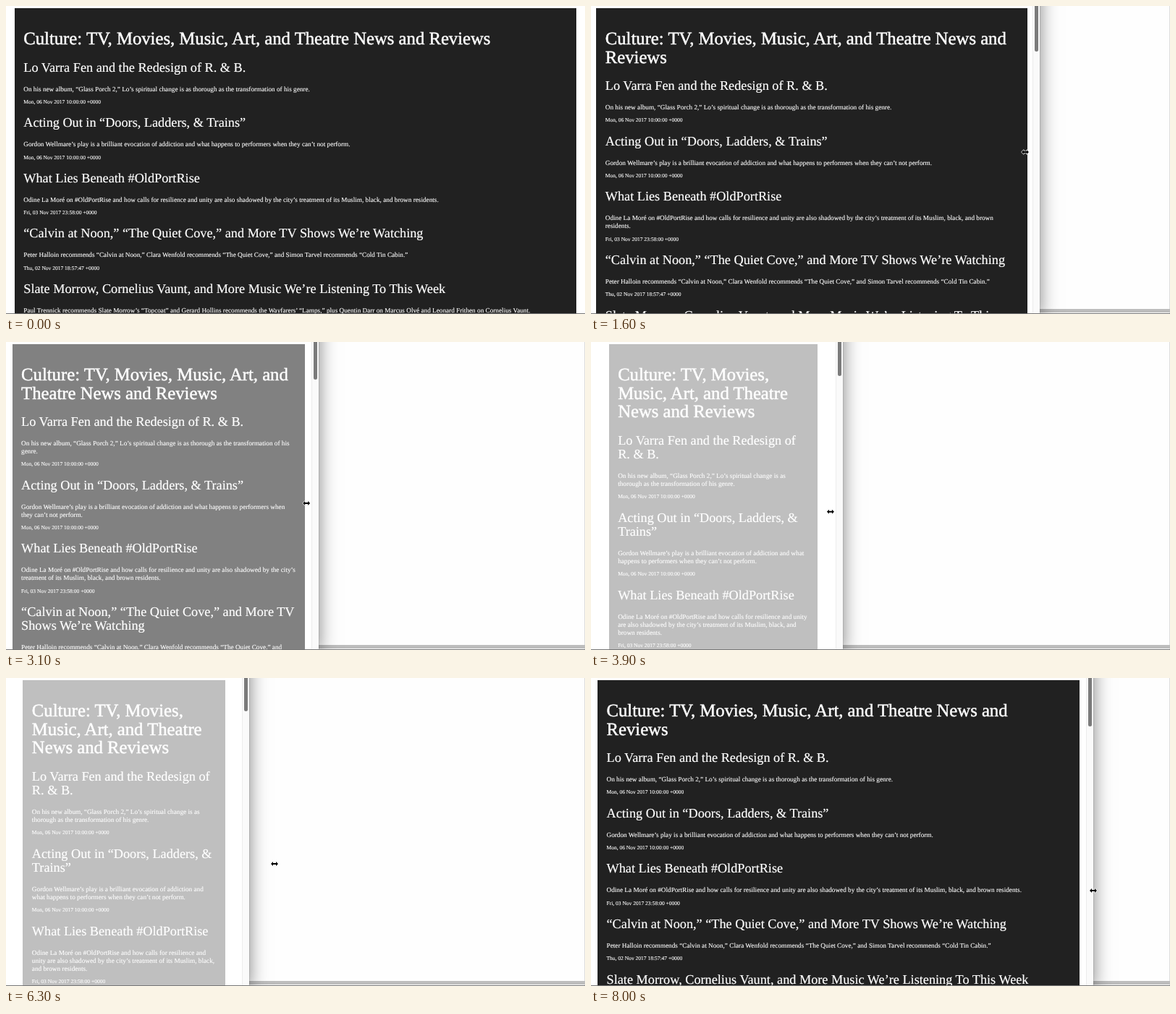
An HTML page that plays this animation: 800 px wide and 426 px high, repeating every 8100 ms.

```html
<!DOCTYPE html>
<html lang="en">
<head>
<meta charset="utf-8">
<title>Responsive news feed</title>
<style>
  html, body { margin: 0; width: 100%; height: 100%; overflow: hidden; background: #fefefe; }
  #stage { position: relative; width: 800px; height: 426px; overflow: hidden; }
  #stage > * { position: absolute; }
  .edge { left: 799px; top: 0; width: 1px; height: 426px; background: #ddd; }
  .hbar { left: 273px; top: 419px; width: 540px; height: 5px; border-radius: 3px; background: #bdbdbd; }
  .base { left: 0; top: 425px; width: 800px; height: 1px; background: #777; }
  /* The window's top edge lies above the stage */
  #win {
    left: 0; top: -40px; height: 465px; background: #fff;
    box-shadow: 0 0 1px rgba(0, 0, 0, .5), 0 6px 24px rgba(0, 0, 0, .5);
  }
  #view, #track { position: absolute; top: 40px; height: 425px; overflow: hidden; }
  #view { left: 0; }
  #track { right: 0; width: 9px; background: #fafafa; border-left: 1px solid #ececec; }
  #thumb { position: absolute; left: 2px; top: -3px; width: 5px; border-radius: 3px; background: #7b7b7b; }
  #feed {
    margin: 3px auto 0; padding: 30.4px 12.5px; color: #fff;
    font-family: "Liberation Serif", "Times New Roman", serif;
    text-rendering: geometricPrecision;
  }
  h1, h2, p { margin: 0; font-weight: 400; }
  h1 { font-size: 24.7px; line-height: 25.5px; margin-bottom: 16.8px; -webkit-text-stroke: .5px; }
  h2 { font-size: 18.24px; line-height: 19.4px; margin-bottom: 14.5px; -webkit-text-stroke: .2px; }
  p { font-size: 9.22px; line-height: 11px; margin-bottom: 7.4px; -webkit-text-stroke: .12px; }
  p.date { font-size: 7.5px; line-height: 9px; margin-bottom: 15.3px; }
  #cursor { left: 0; top: 0; overflow: visible; }
  #cursor path { stroke: #fff; stroke-width: 1.2px; paint-order: stroke; stroke-linejoin: round; }
</style>
</head>
<body>
<div id="stage">
  <div class="edge"></div>
  <div class="hbar"></div>
  <div id="win">
    <div id="view"><div id="feed"></div></div>
    <div id="track"><div id="thumb"></div></div>
  </div>
  <div class="base"></div>
  <svg id="cursor" width="1" height="1"><path/></svg>
</div>
<script>
const LOOP = 8100, STEP = 100, LAG = 160, MIN_WIDTH = 253, TRACK = 10, PAD = 25;

const title = 'Culture: TV, Movies, Music, Art, and Theatre News and Reviews';
const items = [
  ['Lo Varra Fen and the Redesign of R. &amp; B.',
   'On his new album, “Glass Porch 2,” Lo’s spiritual change is as thorough as the transformation of his genre.',
   'Mon, 06 Nov 2017 10:00:00 +0000'],
  ['Acting Out in “Doors, Ladders, &amp; Trains”',
   'Gordon Wellmare’s play is a brilliant evocation of addiction and what happens to performers when they can’t not perform.',
   'Mon, 06 Nov 2017 10:00:00 +0000'],
  ['What Lies Beneath #OldPortRise',
   'Odine La Moré on #OldPortRise and how calls for resilience and unity are also shadowed by the city’s treatment of its Muslim, black, and brown residents.',
   'Fri, 03 Nov 2017 23:58:00 +0000'],
  ['“Calvin at Noon,” “The Quiet Cove,” and More TV Shows We’re Watching',
   'Peter Halloin recommends “Calvin at Noon,” Clara Wenfold recommends “The Quiet Cove,” and Simon Tarvel recommends “Cold Tin Cabin.”',
   'Thu, 02 Nov 2017 18:57:47 +0000'],
  ['Slate Morrow, Cornelius Vaunt, and More Music We’re Listening To This Week',
   'Paul Trennick recommends Slate Morrow’s “Topcoat” and Gerard Hollins recommends the Wayfarers’ “Lamps,” plus Quentin Darr on Marcus Olvé and Leonard Frithen on Cornelius Vaunt.',
   'Thu, 02 Nov 2017 16:20:00 +0000']
];

// Key poses of the drag
const drag = [
  { t: 300, width: 810, y: 194 },
  { t: 1600, width: 620, y: 202 },
  { t: 3100, width: 432, y: 223 },
  { t: 4800, width: MIN_WIDTH, y: 248 },
  { t: 5500, width: MIN_WIDTH, y: 250 },
  { t: 6300, width: 336, y: 257 },
  { t: 7100, width: 511, y: 265 },
  { t: 8000, width: 694, y: 294 }
];

const BOTH = 'M-5 0L-2-3V-1H2V-3L5 0L2 3V1H-2V3Z';
const RIGHT = 'M-4-1H1V-3L4 0L1 3V1H-4Z';

const $ = id => document.getElementById(id);
const win = $('win'), view = $('view'), feed = $('feed'), thumb = $('thumb');
const cursor = $('cursor').firstElementChild;

feed.innerHTML = `<h1>${title}</h1>` + items.map(([head, text, date]) =>
  `<h2>${head}</h2><p>${text}</p><p class="date">${date}</p>`).join('');

function pose(t) {
  const i = Math.max(1, drag.findIndex(p => p.t >= t));
  const [a, b] = t > drag.at(-1).t ? drag.slice(-2) : [drag[i - 1], drag[i]];
  const k = Math.min(1, Math.max(0, (t - a.t) / (b.t - a.t)));
  const mix = key => a[key] + (b[key] - a[key]) * k;
  return { width: mix('width'), y: mix('y') };
}

// Breakpoints: text width and background for a window width
function layout(width, vp) {
  if (width > 485) return [vp * .953 - 10.9, '#212121'];
  if (width > 380) return [vp * .9, '#818181'];
  return [vp * .78, width > 300 ? '#bfbfbf' : '#e5e5e5'];
}

function draw(t) {
  const { width, y } = pose(t);
  const x = pose(t + LAG).width; // the window trails the pointer
  const vp = width - TRACK;
  const [text, color] = layout(width, vp);
  win.style.width = width + 'px';
  view.style.width = vp + 'px';
  feed.style.width = text + 'px';
  feed.style.background = color;
  thumb.style.height = 2.55 * Math.sqrt(vp) + 3 + 'px';
  cursor.setAttribute('d', x <= MIN_WIDTH ? RIGHT : BOTH);
  cursor.setAttribute('transform', `translate(${x} ${y})`);
}

const start = performance.now();
let last = -1;
function tick(now) {
  const t = Math.floor(Math.max(0, now - start) % LOOP / STEP) * STEP;
  if (t !== last) draw(last = t);
  requestAnimationFrame(tick);
}
draw(0);
requestAnimationFrame(tick);
</script>
</body>
</html>
```
